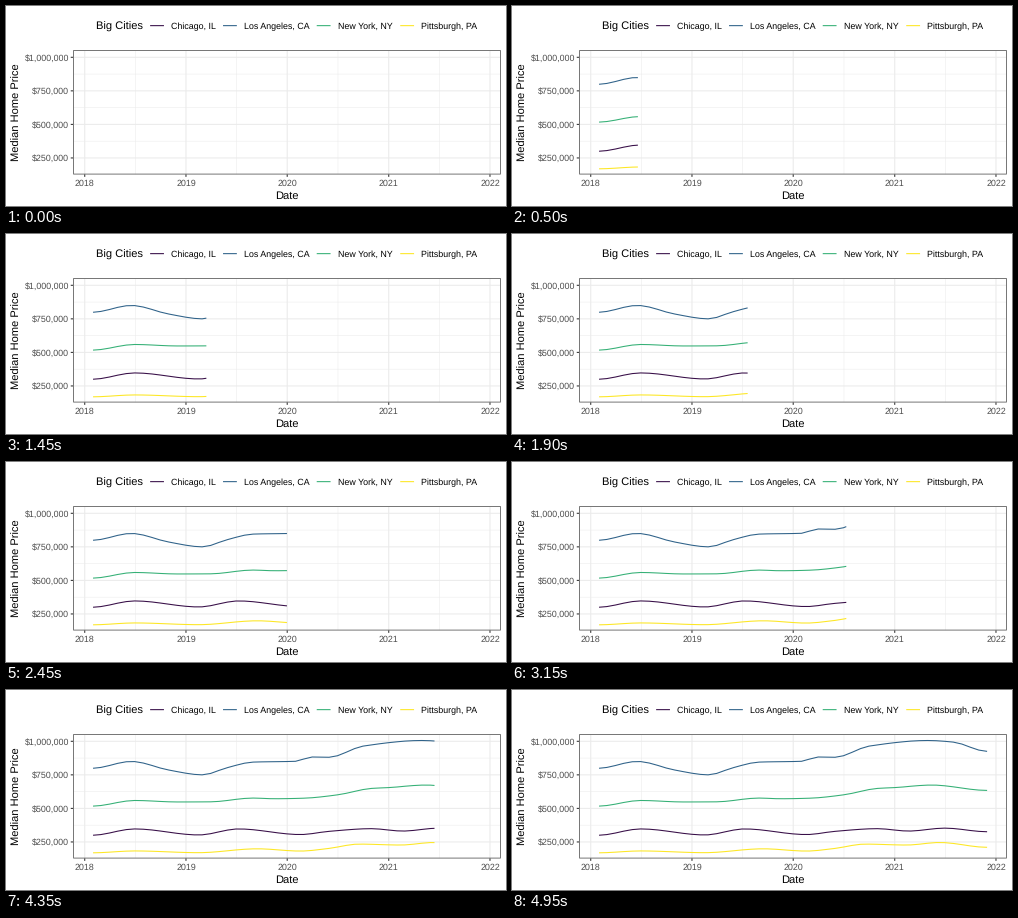
Write a matplotlib script that moves like this. It is 500 px wide and 200 px high and loops after 5 s.

```python
import numpy as np
import matplotlib.pyplot as plt
from matplotlib.animation import FuncAnimation
from matplotlib.patches import Rectangle

plt.rcParams["font.family"] = "Liberation Sans"
plt.rcParams["text.hinting"] = "none"

W, H, DPI = 500, 200, 100
FRAMES, INTERVAL = 100, 50
PX = 72 / DPI  # points per pixel
LEFT, RIGHT, TOP, BOTTOM = 67.5, 494.5, 44.5, 168.1
INK, BORDER, AXIS_TEXT, GRID = "#333333", "#787878", "#4d4d4d", "#ebebeb"
SMALL, LARGE = 8.88, 11.1

# Month-end dates, counted in days from 1 January 2018
START = np.datetime64("2018-01-01")
months = np.arange("2018-02", "2022-01", dtype="datetime64[M]")
days = (months.astype("datetime64[D]") - 1 - START).astype(int)

# label, line colour, turning points as (month, price in thousands)
CITIES = [
    ("Chicago, IL", "#380f48",
     [(0, 300), (5, 347), (12.6, 302), (17.3, 347), (24.6, 305),
      (28, 329), (33, 349), (36.7, 331), (41, 353), (46, 326)]),
    ("Los Angeles, CA", "#2f6289",
     [(0, 799), (4.6, 850), (9, 786), (13, 750), (16, 804), (19, 845),
      (24, 851), (26, 883), (28, 881), (32, 964), (39, 1006), (42, 994),
      (46, 925)]),
    ("New York, NY", "#35b076",
     [(0, 517), (5, 559), (10, 548), (14, 549), (19, 577), (21.5, 572),
      (25, 576), (29, 601), (33, 649), (35, 655), (39.5, 674), (46, 634)]),
    ("Pittsburgh, PA", "#fde725",
     [(0, 169), (5, 183), (12.6, 170), (19.5, 199), (24.6, 182),
      (28, 202), (31.5, 234), (36.5, 227), (40.4, 246), (46, 210)]),
]


def day_x(day):
    return 87.05 + (day - 30) * 388.05 / 1399


def price_y(price):
    """Vertical pixel of a price in thousands of dollars."""
    return 51.3 + (1000 - price) * 33.55 / 250


def smooth(points, at):
    """Cubic curve through the points, level at every turning point."""
    x, y = np.array(points, float).T
    h = np.diff(x)
    s = np.diff(y) / h
    a, b = s[:-1], s[1:]
    slope = np.zeros_like(x)
    same = a * b > 0
    slope[1:-1][same] = 2 * a[same] * b[same] / (a + b)[same]
    i = np.clip(np.searchsorted(x, at, side="right") - 1, 0, len(h) - 1)
    t = (at - x[i]) / h[i]
    ease = t * t * (3 - 2 * t)
    bend = t * (1 - t) * ((1 - t) * slope[i] - t * slope[i + 1])
    return y[i] + (y[i + 1] - y[i]) * ease + h[i] * bend


fig = plt.figure(figsize=(W / DPI, H / DPI), dpi=DPI, facecolor="white")
ax = fig.add_axes([0, 0, 1, 1])
ax.set_xlim(0, W)
ax.set_ylim(H, 0)
ax.axis("off")


def stroke(xs, ys, color, width=1.07, z=1):
    return ax.plot(xs, ys, color=color, lw=width * PX, zorder=z, snap=False,
                   solid_capstyle="butt", solid_joinstyle="round")[0]


def label(x, y, text, size=SMALL, color="black", ha="left", **kw):
    ax.text(x, y, text, fontsize=size * PX, color=color, ha=ha,
            va="baseline", **kw)


def draw_axes():
    year_x = [day_x((np.datetime64(f"{y}-01-01") - START).astype(int))
              for y in range(2018, 2023)]
    prices = [250, 500, 750, 1000]

    for a, b in zip(year_x, year_x[1:]):
        stroke([(a + b) / 2] * 2, [TOP, BOTTOM], GRID, 0.53, 0)
    for p in prices[:-1]:
        stroke([LEFT, RIGHT], [price_y(p + 125)] * 2, GRID, 0.53, 0)

    for i, x in enumerate(year_x):
        stroke([x, x], [TOP, BOTTOM], GRID)
        stroke([x, x], [BOTTOM, BOTTOM + 2.75], INK)
        label(x, 179.6, str(2018 + i), color=AXIS_TEXT, ha="center")
    for p in prices:
        y = price_y(p)
        stroke([LEFT, RIGHT], [y, y], GRID)
        stroke([LEFT - 2.75, LEFT], [y, y], INK)
        label(63, y + 3.15, f"${p * 1000:,}", color=AXIS_TEXT, ha="right")

    ax.add_patch(Rectangle((LEFT, TOP), RIGHT - LEFT, BOTTOM - TOP, fill=False,
                           ec=BORDER, lw=PX, zorder=4, snap=False))
    label((LEFT + RIGHT) / 2, 192.8, "Date", LARGE, ha="center")
    label(13.4, (TOP + BOTTOM) / 2, "Median Home Price", LARGE, ha="center",
          rotation=90, rotation_mode="anchor")


def draw_legend():
    label(90.2, 23.6, "Big Cities", LARGE)
    for (name, color, _), x in zip(CITIES, [142.4, 215.3, 309, 392.5]):
        stroke([x + 1.73, x + 15.55], [19.64, 19.64], color)
        label(x + 22.7, 22.8, name)


draw_axes()
draw_legend()
lines = [stroke([], [], color, z=3) for _, color, _ in CITIES]

# Each month lands on a whole frame; the tip moves linearly in between
month_frame = np.round((days - days[0]) * (FRAMES - 1) / (days[-1] - days[0]))
month_x = day_x(days)
month_y = [price_y(smooth(points, np.arange(len(days))))
           for _, _, points in CITIES]


def update(frame):
    done = month_frame <= frame
    tip_x = np.interp(frame, month_frame, month_x)
    for line, ys in zip(lines, month_y):
        tip_y = np.interp(frame, month_frame, ys)
        line.set_data(np.append(month_x[done], tip_x),
                      np.append(ys[done], tip_y))
        line.set_visible(frame > 0)
    return lines


anim = FuncAnimation(fig, update, frames=FRAMES, interval=INTERVAL,
                     repeat=True, repeat_delay=0, blit=False)
plt.show()
```
